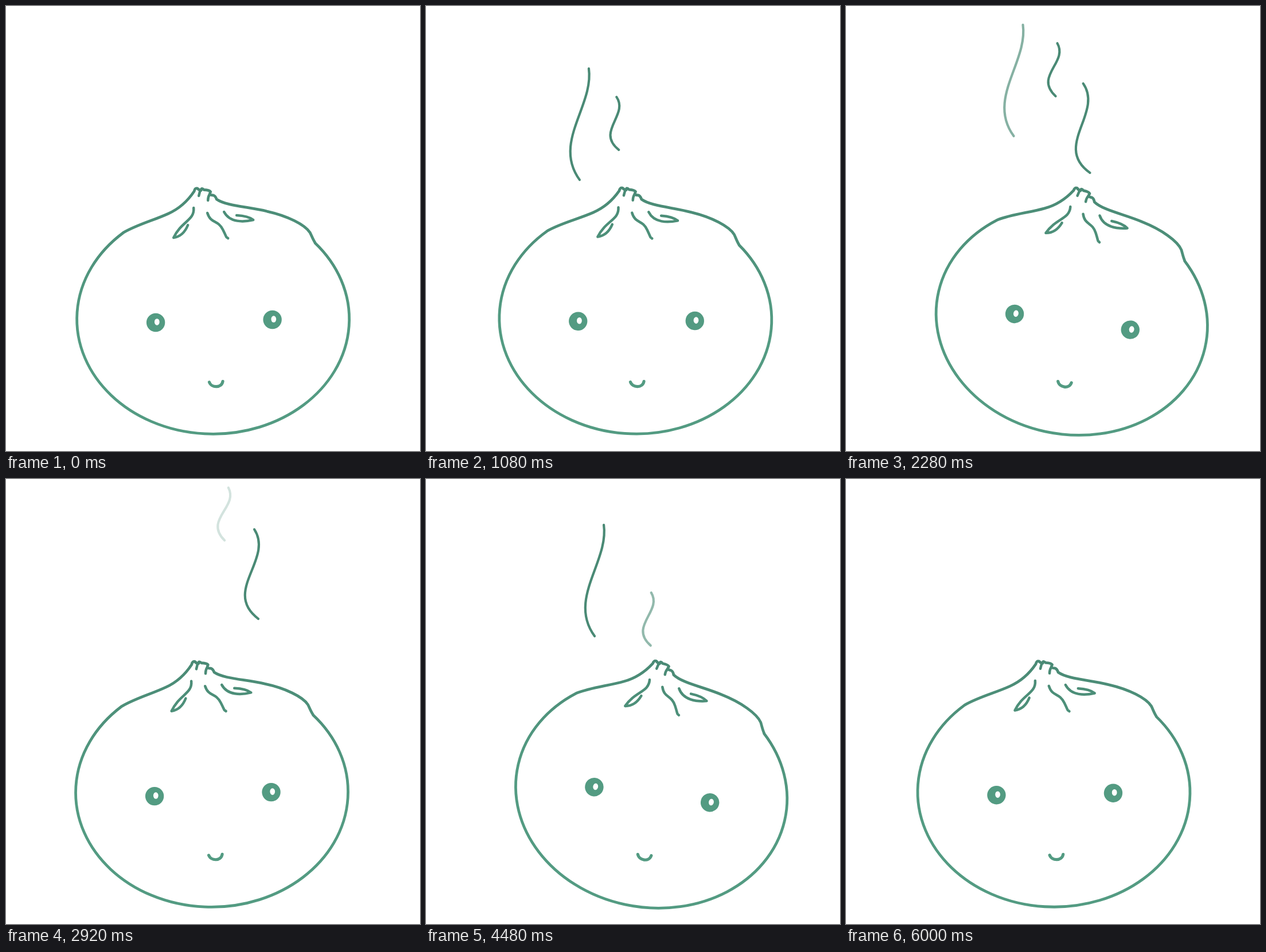
These frames come from a looping animation (722x776 px, 6.04 s). An HTML page with a canvas:

```html
<!DOCTYPE html>
<html lang="en">
<head>
<meta charset="utf-8">
<title>Steaming bun</title>
<style>
  html, body { margin: 0; width: 722px; height: 776px; overflow: hidden; background: #fff; }
  canvas { display: block; }
</style>
</head>
<body>
<canvas id="stage" width="722" height="776"></canvas>
<script>
const ctx = document.getElementById('stage').getContext('2d');
const LOOP = 6040, STEP = 40;
const DARK = '#4a8a75', DEG = Math.PI / 180;
const PIVOT = [371, 749.5], DRAWN_TILT = -1.41;

const green = ctx.createLinearGradient(0, 320, 0, 540);
green.addColorStop(0, DARK);
green.addColorStop(1, '#539b82');

// Turning points of the rocking: [time, degrees]
const turns = [[600, -4.4], [1920, 10], [3400, -5.7], [4740, 8.95]];

// Wisps of steam, each one curve from its top end
const wisps = {
  tall: new Path2D('M0 0C9 65-63.5 129-16 194'),
  small: new Path2D('M0 0C22.6 31-35 61 6.5 92'),
  mid: new Path2D('M0 0C34 52-56.6 108 7 156')
};

// Start place, speed in px/s, start tilt and turn rate in degrees/s
const puffs = [
  { shape: 'tall', from: 60, to: 2560, x: 263, y: 174, vx: 20.5, vy: -63.6, tilt: 0, turn: 0 },
  { shape: 'small', from: 260, to: 3020, x: 307.5, y: 222.6, vx: 30.2, vy: -78, tilt: -1.4, turn: 3.6 },
  { shape: 'mid', from: 1700, to: 3940, x: 396, y: 178, vx: 30.4, vy: -73.9, tilt: -3.4, turn: 2.8 },
  { shape: 'tall', from: 3040, to: 5310, x: 301, y: 134, vx: 6.3, vy: -37.5, tilt: 0, turn: 0 },
  { shape: 'small', from: 4300, to: 5920, x: 389.4, y: 209, vx: 18.5, vy: -60, tilt: 4, turn: 3.6 }
];

// Left shoulder, knot, right shoulder, then the round belly
const bun = new Path2D(`M205 395C229 381 257 374 283 362C303 353 318 338 328 323
  Q329 317 333.5 318Q336 321 340 321.5Q340 316 345 320.5Q355 321 356.5 324
  Q353 330 361 330Q365 331 367 337
  C384 349 424 350 455 358C491 366 521 381 530 395C533 401 535 407 539 413`);
bun.ellipse(361, 546, 237.5, 200.3, 0, -0.725, Math.PI + 0.855);

const folds = new Path2D(`M338.5 321L336 331M355 328Q352 333 352 339
  M327 352C329 374 306 375 292 404C306 402 313 392 317 382
  M351 361C357 380 369 372 378 390S382 401 387 405
  M380 359C390 378 414 377 431 373Q422 366 402 365`);
const smile = new Path2D('M354.5 656C358 666 376 667 378 654.5');

const clamp = v => Math.max(0, Math.min(1, v));

function angleAt(t) {
  if (t < turns[0][0]) t += LOOP;
  let i = turns.length - 1;
  while (t < turns[i][0]) i--;
  const [t0, a] = turns[i];
  const [t1, b] = turns[i + 1] || [turns[0][0] + LOOP, turns[0][1]];
  return a + (b - a) * (1 - Math.cos(Math.PI * (t - t0) / (t1 - t0))) / 2;
}

function line(path, width, color) {
  ctx.lineWidth = width;
  ctx.strokeStyle = color;
  ctx.stroke(path);
}

function oval(x, y, rx, ry, color) {
  ctx.fillStyle = color;
  ctx.beginPath();
  ctx.ellipse(x, y, rx, ry, 0, 0, Math.PI * 2);
  ctx.fill();
}

function drawBun(t) {
  ctx.save();
  ctx.translate(...PIVOT);
  ctx.rotate((angleAt(t) - DRAWN_TILT) * DEG);
  ctx.translate(-PIVOT[0], -PIVOT[1]);
  line(bun, 4.8, green);
  line(folds, 4.5, green);
  line(smile, 5.2, green);
  for (const [x, y] of [[261, 552], [464.5, 547]]) {
    oval(x, y, 16.2, 16.2, green);
    oval(x + 2.2, y - 1, 4.4, 5.8, '#fff');
  }
  ctx.restore();
}

function drawPuff(p, t) {
  if (t <= p.from || t >= p.to) return;
  const s = (t - p.from) / 1000;
  ctx.save();
  ctx.globalAlpha = clamp(s / 0.3) * clamp((p.to - t) / 420);
  ctx.translate(p.x + p.vx * s, p.y + p.vy * s);
  ctx.rotate((p.tilt + p.turn * s) * DEG);
  line(wisps[p.shape], 4.2, DARK);
  ctx.restore();
}

function draw(now) {
  const t = Math.floor((now % LOOP) / STEP) * STEP;
  ctx.fillStyle = '#fff';
  ctx.fillRect(0, 0, 722, 776);
  ctx.lineCap = ctx.lineJoin = 'round';
  drawBun(t);
  puffs.forEach(p => drawPuff(p, t));
}

let start;
function tick(now) {
  start ??= now;
  draw(Math.max(0, now - start));
  requestAnimationFrame(tick);
}
draw(0);
requestAnimationFrame(tick);
</script>
</body>
</html>
```
